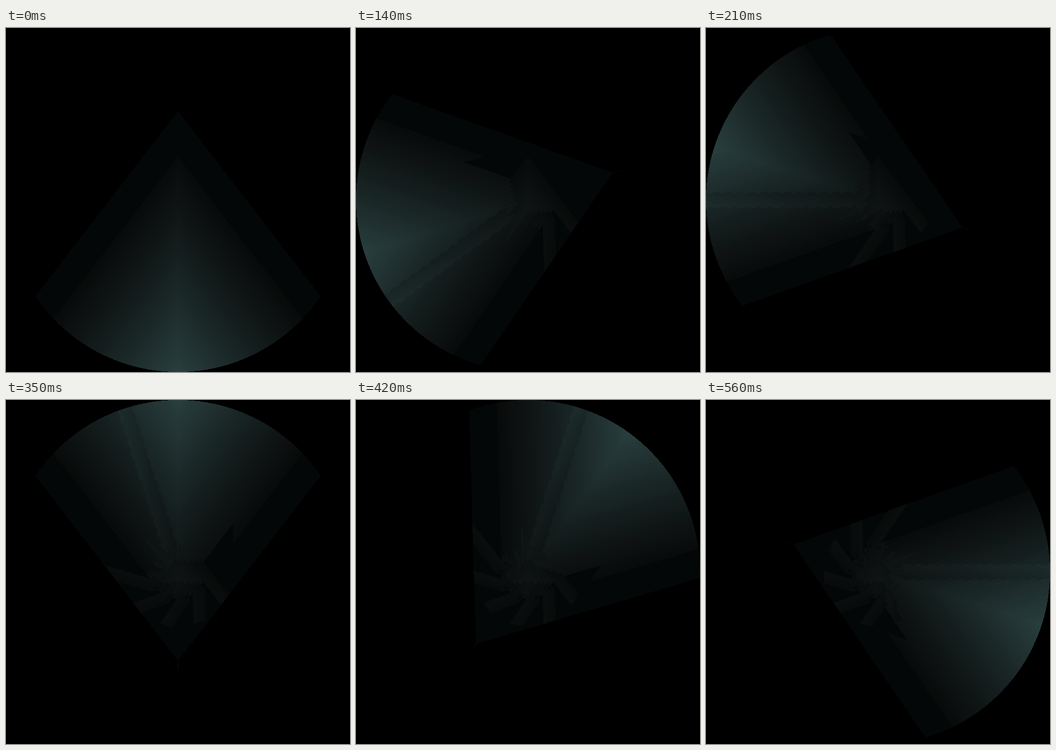
Recreate the animation shown at these times as an HTML page with a canvas. Size 600 by 600 pixels, loop 630 ms.

```html
<!DOCTYPE html>
<html lang="en">
<head>
<meta charset="utf-8">
<title>Rotating beam</title>
<style>
  html, body { margin: 0; width: 100%; height: 100%; overflow: hidden; background: #000; }
  canvas { display: block; width: 100vw; height: 100vh; }
</style>
</head>
<body>
<canvas id="stage" width="600" height="600"></canvas>
<script>
const SIZE = 600, MID = SIZE / 2;
const STEPS = 9, STEP_MS = 70, TURN = Math.PI / 5;
const APEX = -155;                        // beam tip, relative to the centre
const HALF = Math.atan2(248, 322);        // half of the opening angle
const SIN = Math.sin(HALF), COS = Math.cos(HALF);
const RIM = 49, BAND = 7, KEEP = 3;       // dark rim, shade width, trail tolerance

const ctx = document.getElementById('stage').getContext('2d');

function shade(level) {
  if (level < 0) return [0, 0, 0];
  if (level === 0) return [3, 7, 8];
  const t = Math.pow((level - 0.5) * BAND / 228, 1.2);
  return [9 + 32 * t, 11 + 51 * t, 11 + 51 * t].map(Math.round);
}

const palette = Array.from({ length: 40 }, (_, i) => shade(i - 1));

// Shade of the unrotated beam at a point; -1 is outside.
function beam(x, y, hasSpike) {
  if (x * x + y * y > MID * MID) return -1;
  const edge = (y - APEX) * SIN - Math.abs(x) * COS;
  if (edge < 0) {
    const spike = hasSpike && Math.abs(x) < 0.6 && y < APEX && y > APEX - 16;
    return spike ? 0 : -1;
  }
  return edge < RIM ? 0 : 1 + Math.floor((edge - RIM) / BAND);
}

// Each pose keeps the earlier shade wherever the new one is close to it.
function buildPoses() {
  const levels = new Int8Array(SIZE * SIZE).fill(-1);
  const poses = [];
  for (let step = 0; step < STEPS; step++) {
    const c = Math.cos(step * TURN), s = Math.sin(step * TURN);
    const image = ctx.createImageData(SIZE, SIZE);
    for (let i = 0; i < levels.length; i++) {
      const x = i % SIZE + 0.5 - MID;
      const y = Math.floor(i / SIZE) + 0.5 - MID;
      const next = beam(c * x + s * y, c * y - s * x, step > 0);
      const last = levels[i];
      if (next < 0 || last < 0 || Math.abs(next - last) > KEEP) levels[i] = next;
      const [r, g, b] = palette[levels[i] + 1];
      image.data.set([r, g, b, 255], i * 4);
    }
    poses.push(image);
  }
  return poses;
}

const poses = buildPoses();
const start = performance.now();
let shown = -1;

function draw(now) {
  const step = Math.floor(Math.max(0, now - start) / STEP_MS) % STEPS;
  if (step !== shown) ctx.putImageData(poses[shown = step], 0, 0);
  requestAnimationFrame(draw);
}
draw(start);
</script>
</body>
</html>
```
